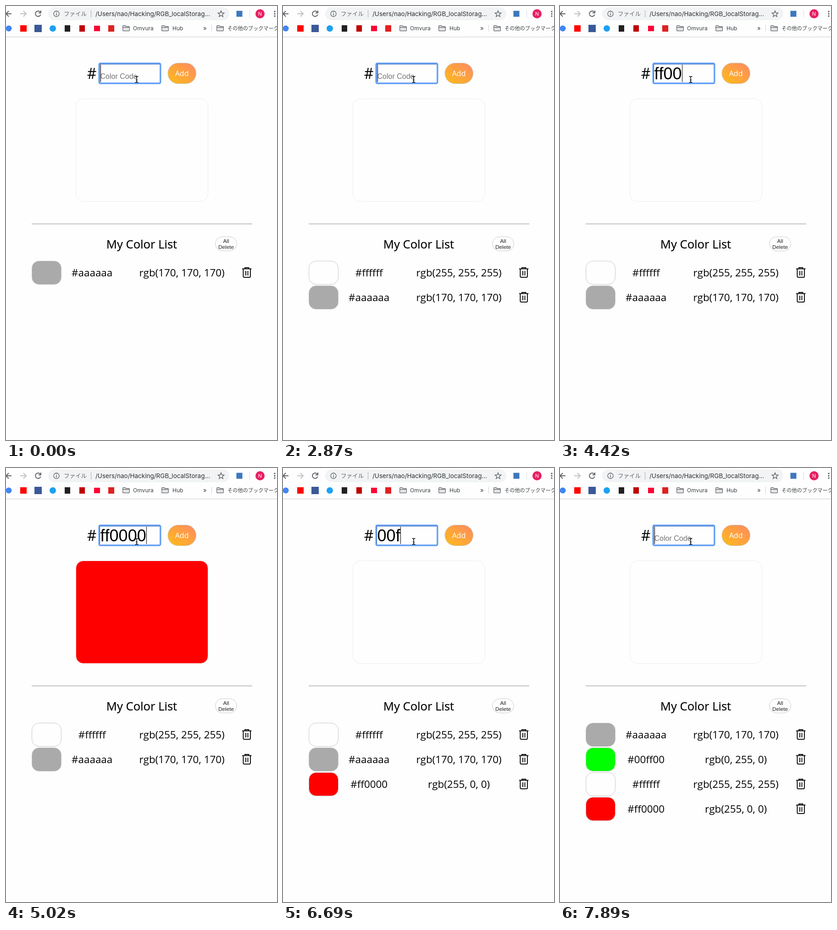
Recreate the animation shown at these times as an HTML page. Size 591 px wide and 947 px high, loop 8000 ms.

```html
<!DOCTYPE html>
<html lang="ja">
<head>
<meta charset="utf-8">
<title>My Color List</title>
<style>
  html, body { margin: 0; width: 100%; height: 100%; overflow: hidden; background: #fefefe; }
  svg { display: block; }
  text { white-space: pre; font-kerning: none; }
  .page { font-family: "Open Sans", sans-serif; }
  .field { font-family: "Liberation Sans", Arial, sans-serif; }
  .ui { font-family: Inter, Roboto, sans-serif; }
  .jp { font-family: "Noto Sans CJK JP", "Noto Sans CJK", sans-serif; }
  .mid { text-anchor: middle; }
  .row { font-size: 22.4px; }
  .line { fill: none; stroke-width: 2; }
</style>
</head>
<body>
<svg width="591" height="947" viewBox="0 0 591 947">
  <defs>
    <linearGradient id="sunset" x1="0" y1="1" x2="1" y2="0">
      <stop offset=".15" stop-color="#feb522"/>
      <stop offset=".9" stop-color="#fe8e5c"/>
    </linearGradient>
    <g id="trash" class="line" stroke="#111">
      <path d="M515 573.6H535.4M521 573V571H529.4V573M517.4 574V589.5Q517.4 592 520 592H530.5Q533 592 533 589.5V574"/>
      <path d="M523 578V588M527.5 578V588"/>
    </g>
    <g id="folder">
      <path d="M.7 11.5V2Q.7 .7 2 .7H6L7.8 2.7H14Q15.3 2.7 15.3 4V11.2Q15.3 12.4 14 12.4H2Q.7 12.4 .7 11.5ZM1 4.6H15"
        fill="#e4e5e6" stroke="#5f6368" stroke-width="1.2"/>
    </g>
  </defs>
  <rect width="591" height="947" fill="#fefefe"/>

  <g id="toolbar">
    <g class="line" stroke="#5f6368" stroke-width="1.8">
      <path d="M12 17H0M6 11L0 17L6 23"/>
      <path d="M31 17H44M38 11L44 17L38 23" stroke="#bfc1c4"/>
      <path id="reload" d="M74.5 13A5.9 5.9 0 1 0 75.7 18.5M76 10V15H71"/>
      <path id="stop" d="M64.5 11.5L75.5 22.5M75.5 11.5L64.5 22.5"/>
    </g>
    <rect x="92" y="3" width="395" height="28" rx="14" fill="#f1f3f4"/>
    <circle cx="110" cy="17" r="6" fill="none" stroke="#5f6368" stroke-width="1.3"/>
    <path d="M110 13.2V14.7M110 16V20.6" stroke="#5f6368" stroke-width="1.5"/>
    <text class="jp" x="126" y="21.5" font-size="12.5" fill="#5f6368">ファイル</text>
    <path d="M185.5 9V25" stroke="#a9acb0"/>
    <text class="ui" x="195" y="22" font-size="13.5" fill="#2c2f33">/Users/nao/Hacking/RGB_localStorag...</text>
    <path id="star" fill="none" stroke="#5f6368" stroke-width="1.4"/>
    <rect x="502.5" y="10.5" width="13" height="13" fill="#3c78bd"/>
    <path d="M531.5 9V25" stroke="#d3dbe8"/>
    <circle cx="554" cy="17" r="10" fill="#e91e63"/>
    <text class="ui mid" x="554" y="21" font-size="11" fill="#fff">N</text>
    <g fill="#5f6368"><circle cx="586" cy="12" r="1.7"/><circle cx="586" cy="17" r="1.7"/><circle cx="586" cy="22" r="1.7"/></g>

    <circle cx="6" cy="49" r="6.5" fill="#4285f4"/>
    <rect x="31" y="42" width="14" height="14" fill="#f00"/>
    <rect x="62" y="41" width="16" height="16" fill="#3b5998"/>
    <circle cx="102" cy="49" r="7" fill="#1da1f2"/>
    <rect x="128" y="42" width="12" height="14" fill="#221f1f"/>
    <rect x="160" y="42" width="12" height="14" fill="#bf0000"/>
    <rect x="192" y="43" width="13" height="12" fill="#f03"/>
    <rect x="223" y="42" width="13" height="14" fill="#e02020"/>
    <use href="#folder" x="254" y="42"/>
    <use href="#folder" x="339" y="42"/>
    <use href="#folder" x="459" y="42"/>
    <g class="ui" font-size="12" fill="#3c4043">
      <text x="277" y="53">Omvura</text>
      <text x="363" y="53">Hub</text>
      <text x="430" y="52.5" font-size="13">»</text>
    </g>
    <path d="M448.5 41V56" stroke="#d0d2d5"/>
    <text class="jp" x="483" y="53" font-size="11.2" fill="#3c4043">その他のブックマーク</text>
    <path d="M0 67.5H591" stroke="#cbcbcb"/>
  </g>

  <g id="page">
    <text class="page" x="176.8" y="159" font-size="32">#</text>
    <rect x="203.2" y="125.2" width="133.6" height="43.6" rx="2.5" fill="#fefefe" stroke="#649ff5" stroke-width="3.4"/>
    <path d="M204.5 166V126.8H335.5" fill="none" stroke="#4076c6" stroke-width="1.2"/>
    <text id="hint" class="field" x="205.5" y="159" font-size="16" fill="#757575">Color Code</text>
    <text id="code" class="field" x="205.6" y="159.5" font-size="36"></text>
    <rect id="caret" y="128" width="1" height="38"/>

    <rect x="353" y="124.5" width="61.5" height="45" rx="22.5" fill="url(#sunset)" stroke="#c9c4be"/>
    <text class="page mid" x="383.6" y="153" font-size="16" fill="#fff">Add</text>

    <rect id="preview" x="152.5" y="202.5" width="288" height="224" rx="16" stroke="#ececec"/>
    <path d="M56 475.5H537" stroke="#8c8c8c"/>
    <text class="page mid" x="296" y="529" font-size="25.6" stroke="#000" stroke-width=".25">My Color List</text>
    <rect x="456.5" y="503.5" width="47" height="31" rx="15.5" fill="#fefefe" stroke="#ccc"/>
    <g class="field mid" font-size="11.7" fill="#222">
      <text x="480" y="517">All</text>
      <text x="480" y="530">Delete</text>
    </g>
    <g id="list"></g>
  </g>

  <path d="M281.5 153.5Q285 153.5 285 156V164.5Q285 167 281.5 167M288.5 153.5Q285 153.5 285 156V164.5Q285 167 288.5 167M283 161.5H287"
    fill="none" stroke="#111" stroke-width="1.4"/>
</svg>
<script>
const LOOP = 8000;
const BLANK = "#fefefe";
const LISTS = [
  ["aaaaaa"],
  ["ffffff", "aaaaaa"],
  ["ffffff", "aaaaaa", "ff0000"],
  ["aaaaaa", "00ff00", "ffffff", "ff0000"]
];

// time, typed code, caret shown, list index, preview colour, loading ("blank" hides the page)
const STEPS = [
  [0, "", 1, 0], [360, "", 0, 0], [840, "", 1, 0],
  [1200, "f", 1, 0], [1320, "ff", 1, 0], [1560, "fff", 1, 0],
  [1680, "ffff", 1, 0], [1800, "fffff", 1, 0], [2040, "ffffff", 1, 0],
  [2520, "ffffff", 0, 0], [2750, "", 0, 1, BLANK, "blank"],
  [2870, "", 1, 1], [3350, "", 0, 1], [3830, "", 1, 1],
  [3950, "f", 1, 1], [4070, "ff", 1, 1], [4180, "ff0", 1, 1],
  [4300, "ff0", 1, 1, "#ff0"], [4420, "ff00", 1, 1], [4780, "ff000", 1, 1],
  [4900, "ff0000", 1, 1], [5020, "ff0000", 1, 1, "#f00"],
  [5500, "ff0000", 0, 1, "#f00"], [5620, "", 0, 2, BLANK, "busy"],
  [5730, "", 1, 2], [6210, "", 0, 2], [6330, "0", 1, 2], [6450, "00", 1, 2],
  [6690, "00f", 1, 2], [6810, "00ff", 1, 2, "#00f"], [7050, "00ff0", 1, 2],
  [7170, "00ff00", 1, 2, "#0f0"], [7650, "00ff00", 0, 2, "#0f0"],
  [7770, "", 0, 3], [7890, "", 1, 3]
];

const $ = id => document.getElementById(id);
const show = (id, on) => { $(id).style.display = on ? "" : "none"; };

const starPoints = Array.from({ length: 10 }, (_, i) => {
  const angle = i * Math.PI / 5 - Math.PI / 2;
  const radius = i % 2 ? 3 : 7;
  return `${469 + radius * Math.cos(angle)} ${17.5 + radius * Math.sin(angle)}`;
});
$("star").setAttribute("d", `M${starPoints.join("L")}Z`);

function toRgb(hex) {
  const parts = hex.match(/../g).map(pair => parseInt(pair, 16));
  return `rgb(${parts.join(", ")})`;
}

function rowMarkup(hex, index) {
  const fill = hex === "ffffff" ? BLANK : `#${hex}`;
  return `<g transform="translate(0 ${index * 54})">
    <rect x="56.5" y="556.5" width="64" height="51" rx="15.5" fill="${fill}" stroke="#c8c8c8"/>
    <text class="page row mid" x="187.7" y="589.5">#${hex}</text>
    <text class="page row mid" x="383.6" y="589.5">${toRgb(hex)}</text>
    <use href="#trash"/></g>`;
}

function caretX(code) {
  return Math.floor([...code].reduce((x, char) => x + (char === "0" ? 20 : 10.15), 206.2));
}

function render([, code, caret, list, preview = BLANK, loading = ""]) {
  $("code").textContent = code;
  $("caret").setAttribute("x", caretX(code));
  $("preview").setAttribute("fill", preview);
  $("list").innerHTML = LISTS[list].map(rowMarkup).join("");
  show("hint", !code);
  show("caret", caret);
  show("page", loading !== "blank");
  show("reload", !loading);
  show("stop", loading);
}

let current;
function tick() {
  const time = performance.now() % LOOP;
  const step = STEPS.findLast(([start]) => start <= time);
  if (step !== current) render(current = step);
  requestAnimationFrame(tick);
}
tick();
</script>
</body>
</html>
```
